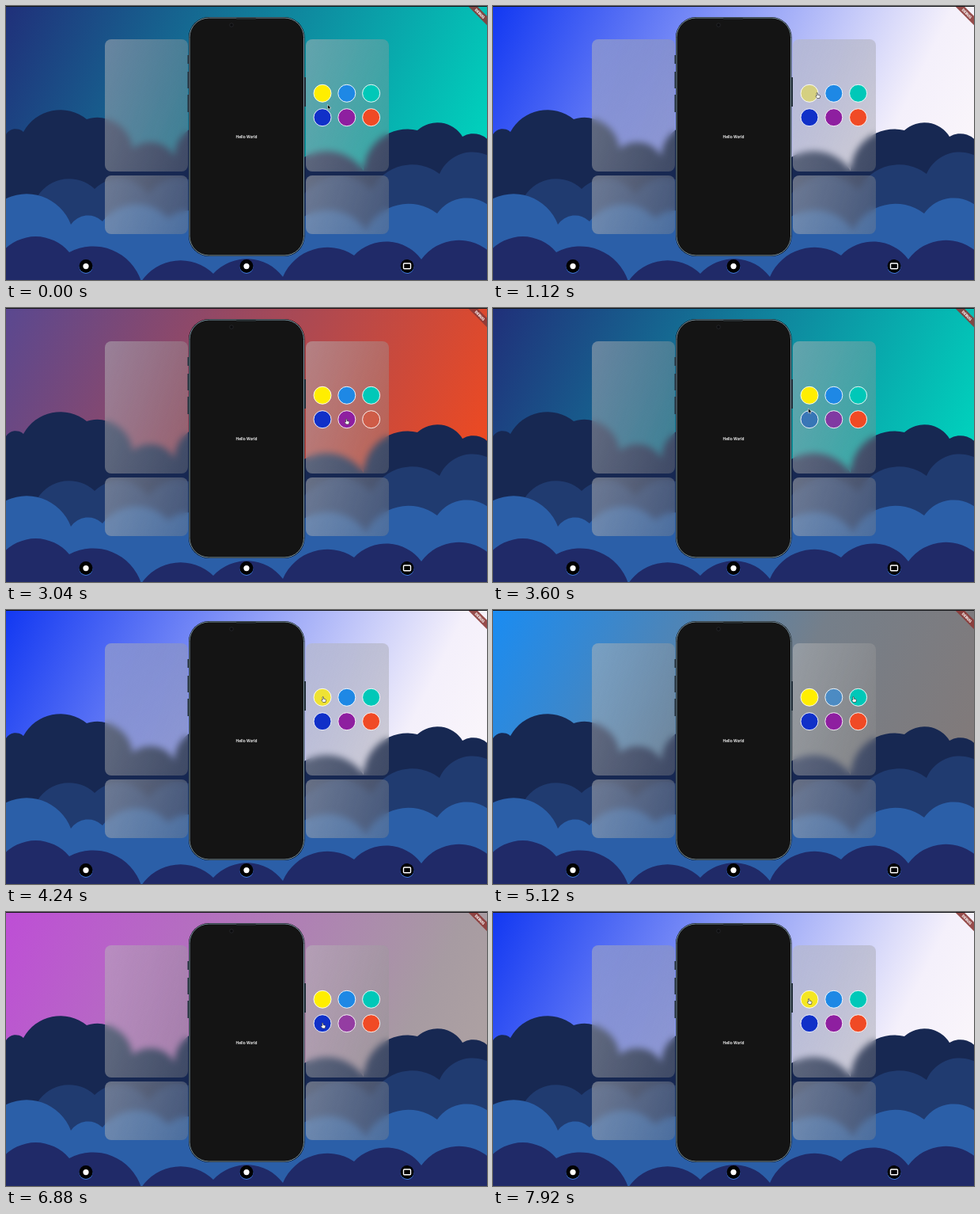
These frames come from a looping animation (608x346 px, 8 s). An HTML page:

```html
<!DOCTYPE html>
<html lang="en">
<head>
<meta charset="utf-8">
<title>Portfolio</title>
<style>
  html, body { margin: 0; width: 100%; height: 100%; overflow: hidden; }
  #stage { position: relative; width: 608px; height: 346px; overflow: hidden; }
  #sky, svg { position: absolute; left: 0; top: 0; width: 608px; height: 346px; }
  .panel {
    position: absolute; width: 105px; border-radius: 8px;
    background: linear-gradient(105deg, rgba(185,185,185,.5), rgba(140,140,140,.34));
    -webkit-backdrop-filter: blur(4px); backdrop-filter: blur(4px);
  }
  .left { left: 125px; }
  .right { left: 378.5px; }
  .tall { top: 42px; height: 167px; }
  .short { top: 214px; height: 74px; }
  text { font-family: Roboto, "Open Sans", sans-serif; fill: #fff; text-anchor: middle; }
</style>
</head>
<body>
<div id="stage">
  <div id="sky"></div>
  <svg id="clouds" viewBox="0 0 608 346"></svg>
  <div class="panel left tall"></div>
  <div class="panel left short"></div>
  <div class="panel right tall"></div>
  <div class="panel right short"></div>
  <svg viewBox="0 0 608 346">
    <!-- phone -->
    <g fill="#22313e">
      <rect x="229.5" y="62" width="2" height="11"/>
      <rect x="229.5" y="83" width="2" height="21"/>
      <rect x="229.5" y="112" width="2" height="22"/>
      <rect x="377" y="90" width="2" height="37"/>
    </g>
    <rect x="231" y="14" width="146.5" height="302" rx="25.5" fill="#050607"/>
    <rect x="232" y="15" width="144.5" height="300" rx="24.5" fill="#141414" stroke="#86a2b2" stroke-width=".9"/>
    <rect x="291" y="15" width="25" height="2" rx="1" fill="#252b2e"/>
    <circle cx="285" cy="24" r="2.3" fill="#0b0b0d" stroke="#2b2d31" stroke-width=".7"/>
    <text x="304" y="167" font-size="5.2" font-weight="500">Hello World</text>

    <g id="dots" stroke="#fff" stroke-width=".9"></g>

    <!-- device switcher -->
    <g id="devices"></g>
    <rect x="502.5" y="325" width="9" height="6.8" rx="1" fill="none" stroke="#fff" stroke-width="1.4"/>

    <!-- corner ribbon -->
    <g transform="translate(599 9.5) rotate(45)">
      <rect x="-22" y="-4" width="44" height="8" fill="#8c3a38" opacity=".9"/>
      <text y="1.8" font-size="4.8" font-weight="900">DEBUG</text>
    </g>
    <rect width="608" height="1" fill="#15171a"/>

    <g id="cursor" stroke-linejoin="round">
      <path id="arrow" d="M-1.5 -2.5V3.5L0 2.2L1 4.2L2 3.7L1.1 1.8H3Z" fill="#000" stroke="#fff" stroke-width=".5"/>
      <path id="hand" d="M-1.5 -3.5Q-.8 -4.2 -.2 -3.5L.2 -1L2.3 -.6Q3.2 -.3 3 .8L2.4 3.2H-.8L-2.8 .7Q-2.6 -.4 -1.2 .3Z" fill="#fff" stroke="#222" stroke-width=".6"/>
    </g>
  </svg>
</div>
<script>
const LOOP = 8000;
const $ = id => document.getElementById(id);

function add(parent, tag, attrs) {
  const el = document.createElementNS('http://www.w3.org/2000/svg', tag);
  for (const k in attrs) el.setAttribute(k, attrs[k]);
  $(parent).append(el);
  return el;
}

// one round bump between each pair of dips; its radius follows its width
function cloud(fill, dips) {
  const pts = dips.split(' ').map(p => p.split(',').map(Number));
  let d = `M${pts[0][0]} 350L${pts[0]}`;
  for (let i = 1; i < pts.length; i++) {
    const [[x0, y0], [x, y]] = [pts[i - 1], pts[i]];
    const r = .65 * Math.hypot(x - x0, y - y0);
    d += `A${r} ${r} 0 0 1 ${x} ${y}`;
  }
  add('clouds', 'path', { fill, d: d + 'V350Z' });
}
cloud('#172852', '0,162 22,159 102,143 160,180 213,190 262,150 365,200 452,208 520,157 577,165 615,178');
cloud('#203b70', '40,240 112,231 180,238 250,230 375,240 462,232 548,212 615,192');
cloud('#2b5fa8', '-5,246 82,276 122,272 205,268 260,275 365,275 455,283 545,262 615,256');
cloud('#202a68', '-5,311 80,311 171,348 262,338 350,342 440,315 525,320 615,314');

for (const x of [101, 304, 507]) {
  add('devices', 'circle', { cx: x, cy: 329.6, r: 8.5, fill: '#3d78d8' });
  add('devices', 'circle', { cx: x, cy: 328.6, r: 8.5 });
  if (x < 507) add('devices', 'circle', { cx: x, cy: 328.6, r: 3.6, fill: '#fff' });
}

// clockwise from top left: button colour and the sky it selects
const night = '#20307a, #00d4be 90%';
const dots = [
  ['#ffee00', '#1238f2, #f4f0fb 75%, #fffafa'],
  ['#1e88e5', '#1a8cf2, #757f8a 55%, #857874'],
  ['#00c8b8', night],
  ['#f04a25', '#5a4890, #ff4a14'],
  ['#8e1fa0', '#be4ed6, #a79ba2 75%, #b2a6a2'],
  ['#1030c8', night]
].map(([fill, sky], i) => {
  const x = 400 + (i < 3 ? i : 5 - i) * 30.8, y = i < 3 ? 110.3 : 140.7;
  return { x, y, sky, el: add('dots', 'circle', { cx: x, cy: y, r: 11, fill }) };
});

// the buttons are clicked in turn, round and round
const clicks = [1000, 1620, 2220, 2840, 3200, 3520, 3860, 4830, 5450, 6050, 6500, 7100, 7500]
  .map((t, i) => ({ t, dot: dots[i % dots.length] }));

// quick fade on press, short hold, slow release
function fade(dt) {
  if (dt < -80 || dt > 500) return 1;
  if (dt < 0) return 1 - .6 * (dt + 80) / 80;
  return .4 + .6 * Math.max(0, dt - 200) / 300;
}

// rest on a button, then glide to the next one shortly before its click
function pointer(t) {
  let x = 408, y = 127, free = 0;
  for (const c of clicks) {
    const end = c.t - 150, begin = Math.max(free, end - 450);
    if (t <= begin) break;
    const u = Math.min(1, (t - begin) / (end - begin));
    const k = 1 - (1 - u) ** 2;
    x += (c.dot.x - x) * k;
    y += (c.dot.y + 3 - y) * k;
    free = c.t + 40;
  }
  return [x, y];
}

let shown;
function draw(t) {
  const last = clicks.filter(c => c.t <= t).pop();
  const sky = last ? last.dot.sky : night;
  if (sky !== shown) {
    $('sky').style.background = `linear-gradient(116deg, ${sky})`;
    shown = sky;
  }
  const [x, y] = pointer(t);
  let over = false;
  for (const d of dots) {
    const own = clicks.filter(c => c.dot === d);
    d.el.setAttribute('fill-opacity', Math.min(...own.map(c => fade(t - c.t))));
    over = over || Math.hypot(x - d.x, y - d.y) < 11;
  }
  $('cursor').setAttribute('transform', `translate(${x} ${y})`);
  $('hand').style.display = over ? '' : 'none';
  $('arrow').style.display = over ? 'none' : '';
}

const start = performance.now();
function tick() {
  draw((performance.now() - start) % LOOP);
  requestAnimationFrame(tick);
}
tick();
</script>
</body>
</html>
```
